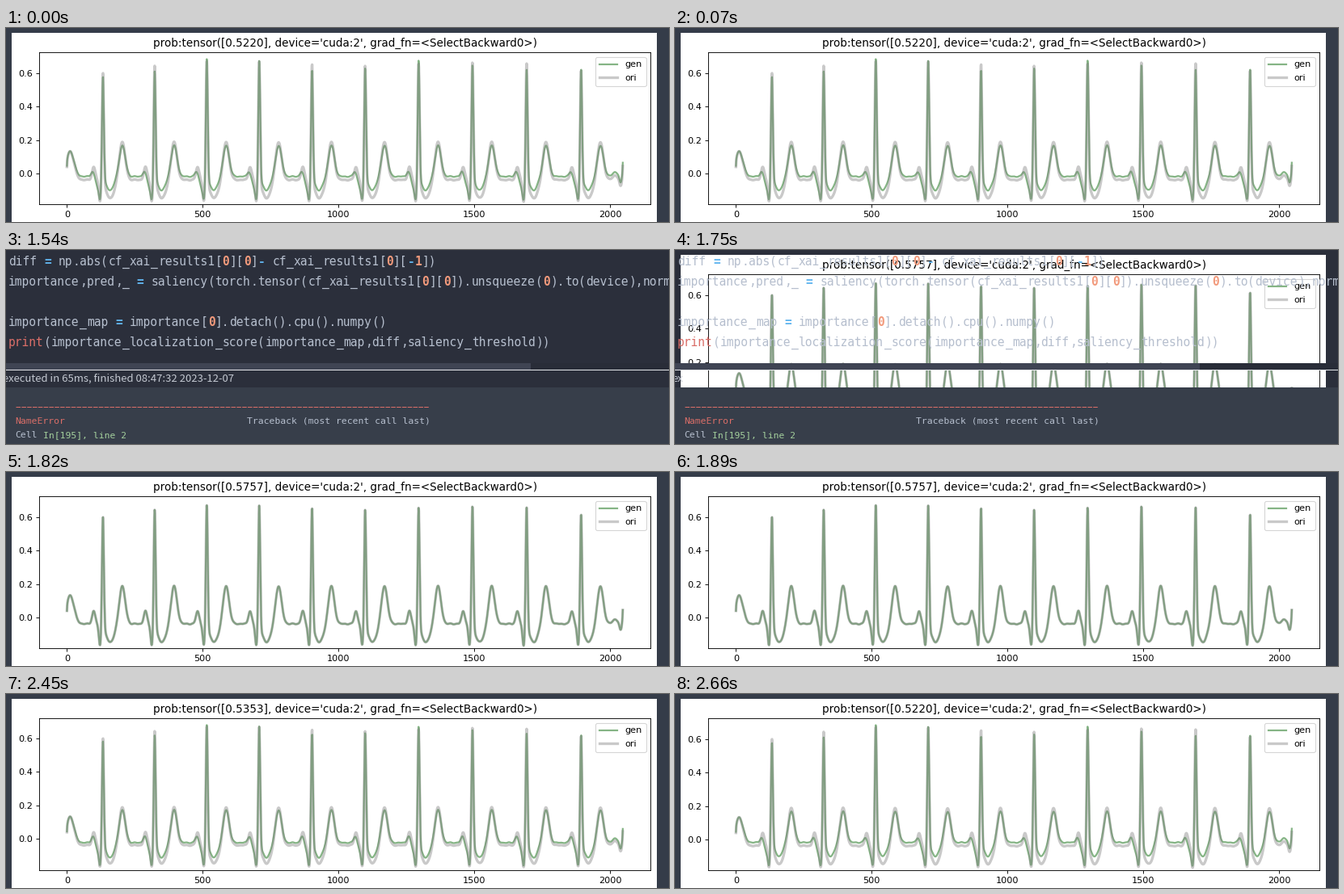
Recreate the animation shown at these times as a matplotlib script. Size 820 by 240 pixels, loop 4340 ms.

```python
from itertools import groupby

import matplotlib.pyplot as plt
import numpy as np
from matplotlib.animation import FuncAnimation
from matplotlib.patches import Rectangle

W, H, DPI = 820, 240, 80
STEP, FRAMES = 70, 62
PT = 72 / DPI  # points per pixel

PANEL, CELL, OUTPUT, BAR = "#353c49", "#2b2f3b", "#373e4a", "#3f4453"
INK = {"text": "#b6bfce", "op": "#61b5ef", "num": "#f29a7c", "call": "#da6e68"}
GREEN = "#a3cf9c"

plt.rcParams.update({
    "font.family": "DejaVu Sans",
    "font.size": 10.16,
    "axes.titlesize": 12.19,
})

# ---- signals: every heartbeat is a sum of bell curves ----
T = np.arange(2048)
K = np.arange(10)
BEATS = 132.5 + 190 * K + .63 * K ** 2
PEAKS = .623 + .045 * np.sin(np.pi * K / 9) + .02 * np.cos(1.15 * (K - 2.1))
DROP = .035 + .03 * np.cos(1.75 * (K - .6))

# (height, offset from the peak, width)
ORI_WAVES = [(.076, -34, 6), (-.125, -10.5, 4.5), (-.108, 27, 16), (.228, 71, 11)]
GEN_WAVES = [(.03, -38, 6), (-.065, -17, 8), (-.09, -10, 4.5), (-.082, 26, 14),
             (.185, 71.5, 11)]


def bell(center, width):
    return np.exp(-((T - center) / width) ** 2 / 2)


def trace(base, waves, peaks):
    y = base + .003 * np.sin(T / 4.3) * np.sin(T / 17)
    for beat, peak in zip(BEATS, peaks):
        y += sum(h * bell(beat + dx, w) for h, dx, w in waves)
        y += (peak + .07) * bell(beat, 3.4)
    y += (.133 - base) * bell(12, 14) - .04 * np.exp(-T / 1.0)
    y += .025 * bell(2018, 10) - .04 * bell(2039, 4)
    return y + .09 * np.exp((T - 2047) / 2)


ori = trace(-.037, ORI_WAVES, PEAKS)
gen = trace(-.017, GEN_WAVES, PEAKS - DROP)

# ---- figure layers ----
fig = plt.figure(figsize=(W / DPI, H / DPI), dpi=DPI)


def pixel_layer(zorder):
    layer = fig.add_axes([0, 0, 1, 1], zorder=zorder)
    layer.set(xlim=(0, W), ylim=(H, 0))
    layer.axis("off")
    return layer


def box(layer, x0, y0, x1, y1, color):
    return layer.add_patch(Rectangle((x0, y0), x1 - x0, y1 - y0, fc=color, lw=0))


back = pixel_layer(0)
frame_bg = box(back, 0, 0, W, H, PANEL)
box(back, 7, 6, 805, H, "white")

LEFT, RIGHT, TOP, BOTTOM = 41, 797.2, 30, 218
ax = fig.add_axes([LEFT / W, 1 - BOTTOM / H, (RIGHT - LEFT) / W, (BOTTOM - TOP) / H],
                  zorder=1)
ax.set_xlim(-102.35, 2149.35)
ax.set_xticks(range(0, 2001, 500))
ax.set_yticks([0, .2, .4, .6])
gen_line, = ax.plot(T, gen, color="darkgreen", alpha=.48, lw=2, label="gen")
ax.plot(T, ori, color="gray", alpha=.42, lw=3, label="ori")
ax.legend(loc="upper right", labelspacing=.58, borderpad=.43)

# ---- notebook cell ----
cell = pixel_layer(2)
cell_bg = box(cell, 0, 0, W, 170, CELL)
box(cell, 0, 140, W, 148, "#292d38")
box(cell, 0, 140, 649, 148, BAR)
box(cell, 0, 148, W, 149, "#e4e6ea")
box(cell, 0, 170, W, H, OUTPUT)


def write(x, y, text, color, px, font="DejaVu Sans Mono", weight="normal"):
    return cell.text(x, y, text, color=color, fontsize=px * PT, family=font,
                     weight=weight, va="baseline")


def kind(line, i):
    c = line[i]
    if c in "=-":
        return "op"
    if c.isdigit() and line[i - 1] in "[(-":
        return "num"
    return "call" if line.startswith("print(") and i < 5 else "text"


def token(line, i):
    return kind(line, i), line[i].isalnum(), line[i] == "_"


CODE = [
    "diff = np.abs(cf_xai_results1[0][0]- cf_xai_results1[0][-1])",
    "importance,pred,_ = saliency(torch.tensor(cf_xai_results1[0][0])"
    ".unsqueeze(0).to(device),norm",
    "",
    "importance_map = importance[0].detach().cpu().numpy()",
    "print(importance_localization_score(importance_map,diff,saliency_threshold))",
]
for row, line in enumerate(CODE):
    for key, run in groupby(range(len(line)), lambda i: token(line, i)):
        cols = list(run)
        write(2.8 + 8.82 * cols[0], 18.7 + 25 * row, line[cols[0]:cols[-1] + 1],
              INK[key[0]], 14.65, weight="normal" if key[0] in ("text", "call") else "bold")

STAMP = "executed in 65ms, finished 08:47:32 2023-12-07"
stamp = write(-3.5, 163, STAMP, "#c3c8d1", 13.1, font="Noto Sans CJK JP")

cell.plot([12, 523], [194, 194], color=INK["call"], lw=PT, ls=(0, (5.6, 1.22)))
write(11.5, 215, "NameError", INK["call"], 11.33)
write(298, 215, "Traceback (most recent call last)", INK["text"], 11.33)
write(11.5, 232, "Cell", INK["text"], 11.33)
write(45.5, 232, "In[195], line 2", GREEN, 11.33)


# ---- animation ----
def show_plot(prob, mix, zero=180.2):
    gen_line.set_ydata(ori + mix * (gen - ori))
    ax.set_ylim((zero - BOTTOM) / 207.5, (zero - TOP) / 207.5)
    ax.set_title(f"prob:tensor([{prob}], device='cuda:2', "
                 "grad_fn=<SelectBackward0>)")


def update(i):
    ms = i * STEP
    coding = 1400 <= ms < 1750
    blending = 1750 <= ms < 1820
    cell.set_visible(coding or blending)
    ax.set_visible(not coding)
    cell_bg.set_visible(coding)
    frame_bg.set_facecolor(CELL if blending else PANEL)
    stamp.set_text("ex" if blending else STAMP)

    if 1750 <= ms < 2100:
        show_plot("0.5757", 0)
    elif 2100 <= ms < 2450:
        show_plot("0.5551", .42, 179.4)
    elif 2450 <= ms < 2660:
        show_plot("0.5353", .75, 179.4)
    else:
        show_plot("0.5220", 1)
    return []


anim = FuncAnimation(fig, update, frames=FRAMES, interval=STEP, repeat=True,
                     repeat_delay=0, blit=False)
plt.show()
```
